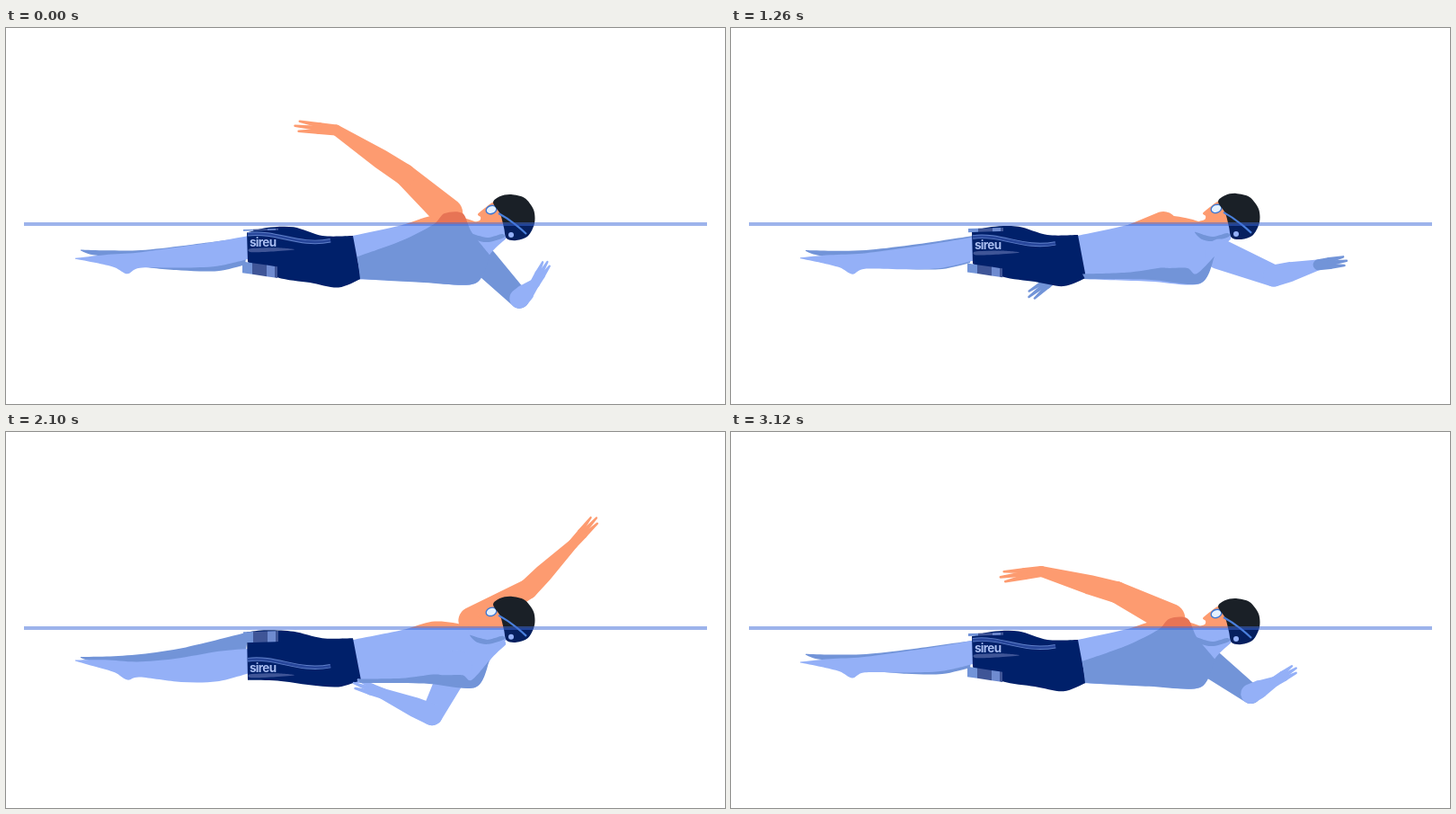
An HTML page with a canvas for the animation above (3240 ms loop, 800 by 418 pixels).

```html
<!DOCTYPE html>
<html lang="en">
<head>
<meta charset="utf-8">
<title>Swimmer</title>
<style>
html, body { margin: 0; width: 100%; height: 100%; overflow: hidden; background: #fff; }
canvas { display: block; }
</style>
</head>
<body>
<canvas id="stage" width="800" height="418"></canvas>
<script>
const ctx = document.getElementById('stage').getContext('2d');
const STEP = 60, LOOP = 3240, CYCLE = 53, SURFACE = 218;

const AIR = { skin: '#fd9b70', shade: '#e77455', far: '#fd9b70', cap: '#1a2027' };
const WATER = { skin: '#94b0f7', shade: '#7294d8', far: '#7294d8', cap: '#06205f' };
const NAVY = '#00206a', SLATE = '#3f5597', HEM = '#6f8bd0';

// One stroke: step, lead of the upper arm over a steady turn, its length,
// forearm angle and length, hand angle (degrees).
const STROKE = [
  [0, 0, 64, 213, 91, 186],
  [6, 47, 71, 295, 84, 281],
  [8, 54, 77, 315, 77, 312],
  [14, 42, 74, 350, 78, 365],
  [25, 5, 60, 333, 33, 328],
  [27, 12, 65, 293, 21, 270],
  [31, 18, 62, 245, 28, 255],
  [35, 17, 61, 203, 60, 200],
  [43, -10, 89, 142, 47, 143],
  [50, -22, 74, 164, 73, 153]
];

// Edges run left to right; each point is x, y and how far y moves with the roll.
const BODY = {
  nearLeg: [
    [[77, 256, -2], [110, 252, 1], [146, 249, 5], [188, 243, 7], [237, 236, 6], [272, 229, 9]],
    [[77, 257, -2], [100, 261, 0], [121, 266, 1], [135, 273, 2], [149, 266, 5], [195, 265, 10], [235, 263, 11], [271, 255, 10]]
  ],
  farLeg: [
    [[83, 246, 3], [112, 247, 2], [150, 247, 0], [200, 242, -2], [270, 234, -9]],
    [[83, 247, 3], [97, 252, 2], [140, 258, 0], [150, 266, -6], [195, 271, -9], [235, 272, -12], [266, 265, -12]]
  ],
  torso: [
    [[376, 233, 0], [440, 219, 1], [477, 208, 2], [514, 212, 3], [556, 231, 2]],
    [[385, 279, 0], [465, 283, -4], [522, 284, 0], [538, 252, 2], [556, 234, 2]]
  ],
  shorts: [
    [[268, 228, -3], [290, 222, 0], [320, 221, 2], [352, 231, 0], [386, 231, 0]],
    [[269, 258, 15], [302, 277, 1], [338, 283, 0], [370, 289, -3], [395, 279, -1]]
  ],
  // The chest shadow swings with the near shoulder instead.
  shadow: [
    [[391, 266, -12], [440, 258, -22], [475, 248, -30], [488, 243, -38], [508, 243, -38], [518, 255, -29], [538, 253, -1]],
    [[394, 279, 0], [465, 281, 2], [522, 284, 0], [538, 254, 0]]
  ]
};

const wave = (n, peak, cycles = 1) => Math.cos(2 * Math.PI * cycles * (n - peak) / CYCLE);
const polar = ([x, y], deg, len) => {
  const a = deg * Math.PI / 180;
  return [x + len * Math.cos(a), y + len * Math.sin(a)];
};
const mix = (a, b, u) => a.map((v, i) => v + (b[i] - v) * u);

// Cyclic cubic interpolation of the rows at step n.
function at(rows, n) {
  const count = rows.length;
  const row = k => rows[(k + count) % count];
  const when = k => row(k)[0] + CYCLE * Math.floor(k / count);
  let i = count - 1;
  while (rows[i][0] > n) i--;
  const span = when(i + 1) - when(i), u = (n - when(i)) / span;
  const slope = (k, j) => (row(k + 1)[j] - row(k - 1)[j]) / (when(k + 1) - when(k - 1)) * span;
  return row(i).slice(1).map((a, c) => {
    const j = c + 1, b = row(i + 1)[j], p = slope(i, j), q = slope(i + 1, j);
    return a + u * (p + u * (3 * (b - a) - 2 * p - q + u * (2 * (a - b) + p + q)));
  });
}

// Smooth line through points, continuing the current path.
function through(pts, closed) {
  const last = pts.length - 1;
  const g = i => closed ? pts[(i + last + 1) % (last + 1)] : pts[Math.max(0, Math.min(last, i))];
  ctx.lineTo(...pts[0]);
  for (let i = 0; i < (closed ? last + 1 : last); i++) {
    const lean = (j, s) => g(j).map((v, c) => v + s * (g(j + 1)[c] - g(j - 1)[c]) * .15);
    ctx.bezierCurveTo(...lean(i, 1), ...lean(i + 1, -1), ...g(i + 1));
  }
}

function fill(color) {
  ctx.fillStyle = color;
  ctx.fill();
}

function blob(pts, color) {
  ctx.beginPath();
  through(pts, true);
  fill(color);
}

// Area between an upper and a lower edge.
function part([top, bottom], swing, color) {
  const move = pts => pts.map(([x, y, d]) => [x, y + d * swing]);
  ctx.beginPath();
  through(move(top));
  through(move(bottom).reverse());
  ctx.closePath();
  fill(color);
}

function stroke(width, color) {
  ctx.lineWidth = width;
  ctx.strokeStyle = color;
  ctx.stroke();
}

// Chain of tapered capsules through [x, y, radius] nodes.
function taper(color, ...nodes) {
  ctx.beginPath();
  for (let i = 1; i < nodes.length; i++) {
    const [ax, ay, ar] = nodes[i - 1], [bx, by, br] = nodes[i];
    const dir = Math.atan2(by - ay, bx - ax), q = Math.PI / 2;
    ctx.moveTo(ax + ar * Math.sin(dir), ay - ar * Math.cos(dir));
    ctx.arc(bx, by, br, dir - q, dir + q);
    ctx.arc(ax, ay, ar, dir + q, dir + 3 * q);
    ctx.closePath();
  }
  fill(color);
}

function arm(n, upper, fore, hand) {
  const [lead, upperLen, foreTurn, foreLen, handTurn] = at(STROKE, n);
  const reach = 38 + 8 * wave(n, 0);
  const shoulder = [512 + 33 * wave(n, 19), 235 - 31 * wave(n, 3)];
  const elbow = polar(shoulder, 222 + 360 * n / CYCLE + lead, upperLen);
  const wrist = polar(elbow, foreTurn, foreLen);
  const palm = polar(wrist, handTurn, reach * .4);
  taper(upper, [...shoulder, 17], [...elbow, 12]);
  taper(fore, [...elbow, 12], [...mix(elbow, wrist, .35), 11], [...wrist, 6]);
  taper(hand, [...wrist, 6], [...palm, 6.5]);
  for (const side of [-1, 0, 1]) {
    const root = polar(palm, handTurn + 90 * side, side ? 3.5 : 0);
    taper(hand, [...root, 3], [...polar(root, handTurn + 5 * side, reach * (side ? .5 : .6)), 1.3]);
  }
}

// Striped trouser hem of the far leg.
function hem(x, y, height, slant) {
  if (height < 1) return;
  ctx.save();
  ctx.transform(1, slant, 0, 1, x, y);
  [[0, 11, WATER.shade], [11, 16, SLATE], [27, 9, HEM], [36, 3, SLATE]].forEach(([dx, w, color]) => {
    ctx.fillStyle = color;
    ctx.fillRect(dx, 0, w, height);
  });
  ctx.restore();
}

function drawShorts(roll, y) {
  part(BODY.shorts, roll, NAVY);
  const turned = Math.max(0, Math.min(1, roll));
  hem(263, 257 + 16 * turned, 15 * (1 - turned), .15);
  hem(264, 224, 12 * turned, -.03);
  ctx.beginPath();
  ctx.moveTo(269, y - 10);
  ctx.bezierCurveTo(302, y - 14, 325, y + 4, 361, y - 3);
  stroke(4.5, '#5f7fc9');
  stroke(2.6, '#27469a');
  blob([[272, y + 6], [300, y + 5], [321, y + 7], [300, y + 9], [273, y + 10]], SLATE);
  ctx.fillStyle = '#a9bdf0';
  ctx.font = '700 13.5px Inter, sans-serif';
  ctx.letterSpacing = '-0.7px';
  ctx.fillText('sireu', 271, y + 4);
}

function drawHead(p) {
  blob([[519, 217], [514, 225], [522, 235], [538, 240], [556, 234], [558, 212], [549, 194],
    [543, 193], [533, 200], [525, 207], [528, 210], [527, 214]], p.skin);
  if (p === WATER) {
    blob([[516, 228], [526, 231], [537, 233], [552, 229], [554, 233], [537, 238], [524, 236]], p.shade);
  }
  ctx.beginPath();
  ctx.ellipse(540, 202, 6, 4.5, -.35, 0, 7);
  fill('#e4f1ff');
  stroke(1.4, '#3b78d4');
  blob([[542, 194], [550, 187], [562, 185], [577, 189], [587, 202], [588, 217], [581, 231],
    [568, 236], [557, 234], [554, 222], [550, 207]], p.cap);
  ctx.beginPath();
  ctx.moveTo(548, 206);
  ctx.quadraticCurveTo(563, 214, 579, 229);
  stroke(2.2, '#4a80dd');
  ctx.beginPath();
  ctx.arc(562, 230, 3, 0, 7);
  fill('#94b0f7');
}

function within(transform, draw) {
  ctx.save();
  ctx.transform(...transform);
  draw();
  ctx.restore();
}

function scene(n, p, top, height) {
  const turn = wave(n, 9.5), roll = .5 - .8 * turn;
  const lift = 1.5 * (wave(n, 0, 2) - 1);
  const farStep = (n + 26) % CYCLE, far = .92;
  const farFore = farStep > 10 && farStep < 29 ? p.skin : p.far;
  ctx.save();
  ctx.beginPath();
  ctx.rect(0, top, 800, height);
  ctx.clip();
  within([far, 0, 0, far, 500 * (1 - far), 215 * (1 - far)], () => arm(farStep, p.far, farFore, farFore));
  part(BODY.farLeg, roll, p.shade);
  part(BODY.nearLeg, roll, p.skin);
  part(BODY.torso, roll, p.skin);
  within([1, 0, 0, 1, 0, lift * .8], () => drawShorts(roll, 247 - 18 * turn));
  within([1, 0, 0, 1, 0, lift], () => drawHead(p));
  arm(n, p.skin, p.skin, n > 3 && n < 30 ? p.shade : p.skin);
  part(BODY.shadow, wave(n, 2), p.shade);
  ctx.restore();
}

function frame() {
  const n = Math.min(CYCLE - 1, Math.floor(performance.now() % LOOP / STEP));
  ctx.fillStyle = '#fff';
  ctx.fillRect(0, 0, 800, 418);
  scene(n, AIR, 0, SURFACE);
  scene(n, WATER, SURFACE, 418 - SURFACE);
  ctx.fillStyle = 'rgba(60, 104, 216, .5)';
  ctx.fillRect(20, SURFACE - 2, 760, 4);
  requestAnimationFrame(frame);
}
frame();
</script>
</body>
</html>
```
